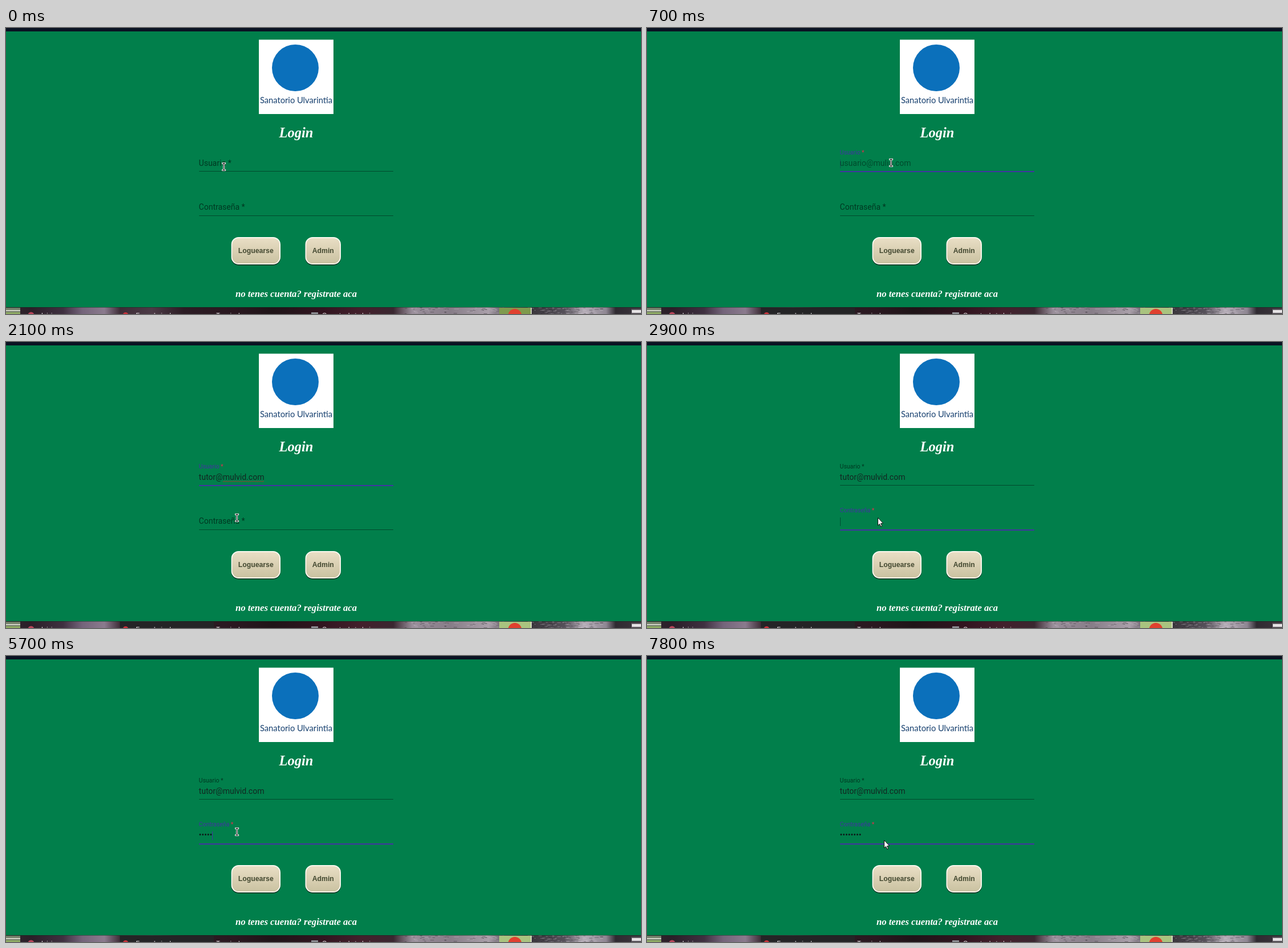
An HTML page with a canvas for the animation above (8 s loop, 1115x502 px).

```html
<!DOCTYPE html>
<html lang="es">
<head>
<meta charset="utf-8">
<title>Login</title>
<style>
  html, body { margin: 0; width: 100%; height: 100%; overflow: hidden; background: #017f4b; }
  canvas { display: block; }
</style>
</head>
<body>
<canvas id="stage" width="1115" height="502"></canvas>
<script>
const ctx = document.getElementById('stage').getContext('2d');
const LOOP = 8000, STEP = 100;
const LEFT = 338.6, LINE_X = 339, LINE_W = 341;
const ACCENT = '#4333a3', STAR = '#e0304c', FAINT = 'rgba(0,0,0,.42)', MUTED = 'rgba(0,0,0,.56)';
const ROBOTO = 'Roboto, sans-serif', SERIF = '"Liberation Serif", serif', SANS = '"Liberation Sans", sans-serif';
const USER = 'tutor@', DOMAIN = 'mulvid.com', HINT = 'usuario@mulip.com';
const KEY_TIMES = [4500, 4800, 5000, 5200, 5700, 6200, 6500, 7100];
// time, x, y of the pointer hot spot
const POINTER = [
  [0, 382, 243], [400, 393, 240], [800, 440, 235], [1100, 440, 235], [1300, 464, 235],
  [1700, 464, 235], [2100, 405, 308], [7500, 405, 308], [7800, 416, 323], [LOOP, 416, 323]
];

const clamp = v => Math.max(0, Math.min(1, v));
const mix = (a, b, k) => a + (b - a) * k;
const within = (t, a, b) => t >= a && t < b;
const easeOut = k => 1 - (1 - clamp(k)) ** 3;

function rect(x, y, w, h, fill) {
  ctx.fillStyle = fill;
  ctx.fillRect(x, y, w, h);
}

function disc(x, y, r, fill) {
  ctx.fillStyle = fill;
  ctx.beginPath();
  ctx.arc(x, y, r, 0, Math.PI * 2);
  ctx.fill();
}

function text(str, x, y, font, fill, align = 'left') {
  ctx.font = font;
  ctx.fillStyle = fill;
  ctx.textAlign = align;
  ctx.fillText(str, x, y);
  return ctx.measureText(str).width;
}

function gradient(x0, y0, x1, y1, colors) {
  const g = ctx.createLinearGradient(x0, y0, x1, y1);
  colors.forEach(([at, color]) => g.addColorStop(at, color));
  return g;
}

function button(label, x, w) {
  const y = 367, h = 48;
  const shape = (dx, dy, width, height, r, fill) => {
    ctx.fillStyle = fill;
    ctx.beginPath();
    ctx.roundRect(dx, dy, width, height, r);
    ctx.fill();
  };
  shape(x, y + 1.5, w, h, 13, '#06301d');
  shape(x, y, w, h, 13, '#fffdf5');
  shape(x + 1.7, y + 1.7, w - 3.4, h - 3.4, 11.5,
    gradient(0, y, 0, y + h, [[0, '#eadfc6'], [1, '#c9c1a0']]));
  text(label, x + w / 2, 395.4, `bold 12.27px ${SANS}`, '#434830', 'center');
}

function floatingLabel(word, baseline, lift, focused) {
  const size = mix(14, 10.5, lift);
  const y = baseline - 20.5 * lift;
  const font = `${size}px ${ROBOTO}`;
  const w = text(word + ' ', LEFT, y, font, focused ? ACCENT : MUTED);
  text('*', LEFT + w, y, font, focused ? STAR : MUTED);
}

function underline(y, focus) {
  rect(LINE_X, y, LINE_W, 1, FAINT);
  if (focus > 0) {
    ctx.globalAlpha = focus;
    const w = LINE_W * mix(.5, 1, focus);
    rect(LINE_X + (LINE_W - w) / 2, y, w, 2, ACCENT);
    ctx.globalAlpha = 1;
  }
}

function squiggle(x0, x1, y) {
  ctx.strokeStyle = '#b5362a';
  ctx.lineWidth = 1;
  ctx.beginPath();
  for (let x = x0; x <= x1; x += 1) ctx.lineTo(x, y + Math.sin((x - x0) * 1.57) * .6);
  ctx.stroke();
}

function userField(t) {
  const focus = within(t, 100, 2400) ? easeOut((t - 50) / 300) : 0;
  const lift = easeOut((t - 50) / 300);
  underline(251, focus);
  floatingLabel('Usuario', 242, lift, focus > 0);
  const font = `14px ${ROBOTO}`;
  if (t >= 1200) {
    const ink = 'rgba(22,22,26,.85)';
    const split = LEFT + text(USER, LEFT, 242, font, ink);
    const end = split + text(DOMAIN, split, 242, font, ink);
    if (t < 2400) squiggle(split, end, 244.7);
    if (t < 1800) rect(Math.floor(end), 231, 1, 15, ACCENT);
  } else if (t >= 100) {
    text(HINT, LEFT, 242, font, `rgba(0,0,0,${.42 * easeOut((t - 100) / 250)})`);
    if (within(t, 300, 800)) rect(LINE_X, 231, 1, 15, 'rgba(40,30,90,.4)');
  }
}

function passwordField(t) {
  const focused = t >= 2900;
  underline(329, focused ? 1 : 0);
  floatingLabel('Contraseña', 319, focused ? 1 : 0, focused);
  const count = KEY_TIMES.filter(k => t >= k).length;
  text('•'.repeat(count), LEFT, 319, `14px ${ROBOTO}`, 'rgba(16,16,20,.9)');
  const caretOn = within(t, 2900, 3100) || within(t, 3600, 4300) || within(t, 4500, 7600);
  if (caretOn) {
    const x = count ? Math.floor(338.5 + 4.7 * count) : LINE_X;
    rect(x, 308, 1, 15, t < 5000 ? 'rgba(0,30,30,.5)' : ACCENT);
  }
}

function logo() {
  rect(444, 20.5, 131, 130.5, '#fff');
  disc(508, 70, 41, '#0b70bb');
  text('Sanatorio Ulvarintia', 509.5, 132, '14.7px Lato, sans-serif', '#17406f', 'center');
}

function taskbar(t) {
  const y = 490, h = 12, active = t >= 200;
  rect(0, y, 1115, h, gradient(0, 0, 1115, 0, [
    [0, '#33262f'], [.04, '#2a1f28'], [.09, '#3f3040'], [.12, '#74647a'], [.155, '#8b7b8e'],
    [.18, '#3d2c36'], [.23, '#4c3a46'], [.28, '#2c1c24'], [.36, '#2a1820'], [.42, '#1f1418'],
    [.5, '#321520'], [.56, '#43202c'], [.61, '#3a2730'], [.64, '#9a8f9b'], [.7, '#877d88'],
    [.76, '#aaa0aa'], [.78, '#6d6670'], [.83, '#3b373d'], [.88, '#56515a'], [.91, '#b5adb7'],
    [.945, '#8f8793'], [.96, '#2f2a31'], [1, '#3b353c']
  ]));
  let seed = 7;
  const rnd = () => (seed = seed * 16807 % 2147483647) / 2147483647;
  for (let i = 0; i < 150; i++) {
    const x = 700 + rnd() * 345;
    rect(x, y + rnd() * h, 2 + rnd() * 5, 1, rnd() < .5 ? 'rgba(35,30,38,.4)' : 'rgba(215,205,215,.35)');
  }
  rect(0, y, 1115, 1, 'rgba(20,35,28,.45)');

  rect(0, 491, 25, 11, '#74806a');
  rect(0, 495, 25, 2, '#d0d3c6');
  rect(0, 499, 25, 3, '#8eab64');
  if (active) rect(200, 491, 165, 11, '#242426');
  disc(44, 504, 5.5, '#b8455a');
  disc(210, 504, 5, '#c8323a');
  rect(536, 499, 12, 3, '#8a8a90');
  const caption = (str, x) => text(str, x, 508, `11px ${SANS}`, '#e9e5e8');
  caption('Inicio', 62);
  caption('Formulario de acceso', 228);
  caption('Terminal', 369);
  caption('Carpeta de trabajo', 555);

  rect(866, 491, 57, 11, active ? '#a9c37f' : '#7f9a4d');
  rect(921.5, 491, 1.5, 11, '#e4e8d6');
  disc(893.5, 505, 12, '#e0402f');
  rect(1098, 493, 17, 9, '#5a555c');
  rect(1099, 495, 16, 5, '#e5e2e4');
}

function pointerAt(t) {
  const i = POINTER.findIndex(p => p[0] > t);
  const [t0, x0, y0] = POINTER[i - 1], [t1, x1, y1] = POINTER[i];
  const k = (t - t0) / (t1 - t0);
  return [mix(x0, x1, k), mix(y0, y1, k)];
}

function beam(x, y) {
  const bars = (grow, fill) => {
    rect(x - 2.5 - grow, y - 6.5 - grow, 5 + 2 * grow, 1 + 2 * grow, fill);
    rect(x - 2.5 - grow, y + 5.5 - grow, 5 + 2 * grow, 1 + 2 * grow, fill);
    rect(x - .5 - grow, y - 6.5, 1 + 2 * grow, 13, fill);
  };
  bars(1, '#e6e9e6');
  bars(0, '#101010');
}

function arrow(x, y) {
  const pts = [[0, 0], [0, 13.5], [3, 10.8], [5.2, 15.6], [7.2, 14.7], [5.1, 10], [9, 9.6]];
  ctx.beginPath();
  pts.forEach(([dx, dy]) => ctx.lineTo(x + dx, y + dy));
  ctx.closePath();
  ctx.fillStyle = '#fff';
  ctx.fill();
  ctx.strokeStyle = '#111';
  ctx.lineWidth = 1;
  ctx.lineJoin = 'round';
  ctx.stroke();
}

function pointer(t) {
  const [x, y] = pointerAt(t).map(Math.round);
  if (within(t, 2900, 3100) || t >= 7700) arrow(x + .5, y + .5);
  else beam(x + .5, y + .5);
}

function draw(t) {
  rect(0, 0, 1115, 502, '#017f4b');
  rect(0, 0, 1115, 6, '#0a1222');
  logo();
  text('Login', 509.5, 192, `italic bold 24.5px ${SERIF}`, '#fff', 'center');
  userField(t);
  passwordField(t);
  button('Loguearse', 395.5, 86.5);
  button('Admin', 525.5, 62.5);
  text('no tenes cuenta? registrate aca', 509.5, 471.5, `italic bold 16.7px ${SERIF}`, '#fff', 'center');
  taskbar(t);
  pointer(t);
}

let start = null;
function tick(now) {
  start ??= now;
  const t = (now - start) % LOOP;
  draw(Math.floor(t / STEP) * STEP);
  requestAnimationFrame(tick);
}
requestAnimationFrame(tick);
</script>
</body>
</html>
```
